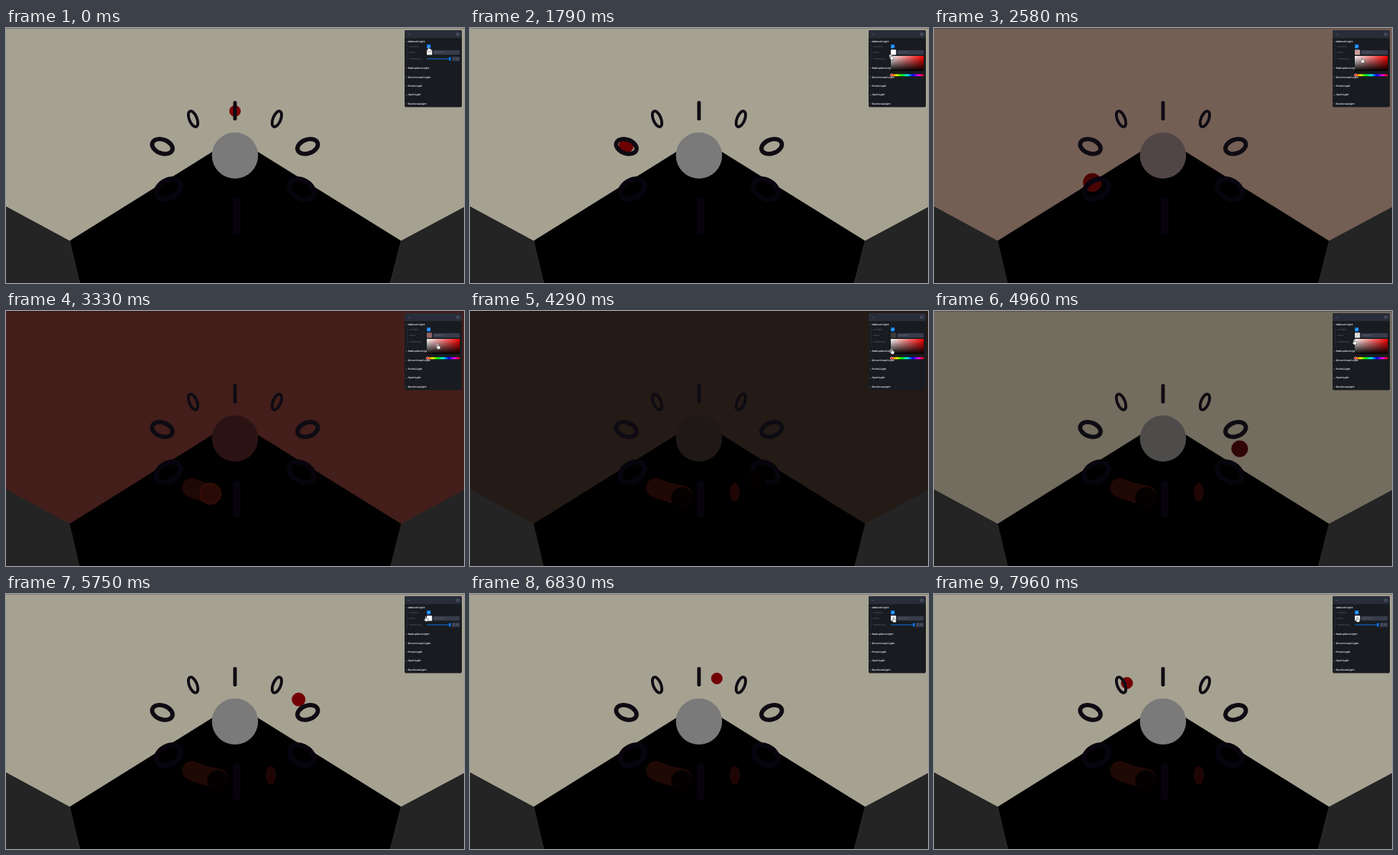
An HTML page that plays this animation: 640x356 px, repeating every 8000 ms.

```html
<!DOCTYPE html>
<html lang="en">
<head>
<meta charset="utf-8">
<title>Ambient light</title>
<style>
html, body { margin: 0; width: 100%; height: 100%; overflow: hidden; background: #000; }
svg { display: block; width: 100vw; height: 100vh; }
text { font: 3.25px "DejaVu Sans Mono", monospace; fill: #6b7180; }
.head { font-weight: bold; fill: #f2f3f5; }
</style>
</head>
<body>
<svg viewBox="0 0 640 356" preserveAspectRatio="none">
  <defs>
    <linearGradient id="sat"><stop stop-color="#fff"/><stop offset="1" stop-color="#f00"/></linearGradient>
    <linearGradient id="val" x2="0" y2="1"><stop stop-color="#000" stop-opacity="0"/><stop offset="1"/></linearGradient>
    <linearGradient id="hue"></linearGradient>
  </defs>
  <rect id="wall" width="640" height="356"/>
  <path d="M0 .5H640" stroke="#000" stroke-opacity=".25"/>
  <path d="M0 249L89 297L103 356H0ZM640 250L552 297L537 356H640Z" fill="#242424"/>
  <path d="M320 153L552 297L537 356H103L89 297Z"/>
  <g id="trail">
    <path id="streak" fill="none" stroke="#1f0905" stroke-width="27" stroke-linecap="round"/>
    <circle id="gap" cx="296" cy="261" r="15" fill="#050101"/>
    <ellipse id="spot" cx="370" cy="253" rx="7" ry="13" fill="#1f0604"/>
  </g>
  <g id="scene"><circle id="globe" cx="320" cy="178" r="32.3"/></g>
  <g id="panel">
    <rect x="557" y="3" width="80" height="107.5" rx="2" fill="#181c20"/>
    <path d="M557 14V5a2 2 0 0 1 2-2h76a2 2 0 0 1 2 2v9Z" fill="#292d39"/>
    <path d="M562 8.5l1 1 1-1" fill="none" stroke="#8c92a4" stroke-width=".6"/>
    <circle cx="631.3" cy="8.7" r="1.7" fill="none" stroke="#8c92a4" stroke-width=".6"/>
    <path d="M560.6 23V47" stroke="#373c4b" stroke-width=".5"/>
    <text x="563" y="26.6">visible</text>
    <text x="563" y="35.4">color</text>
    <text x="563" y="44.4">intensity</text>
    <rect x="588" y="23" width="5.4" height="5.4" rx=".8" fill="#0a7cff"/>
    <path d="M589.3 25.8l1 1 1.8-2.2" fill="none" stroke="#fff" stroke-width=".7"/>
    <rect id="swatch" x="588" y="30.3" width="7.4" height="7.2" rx=".8"/>
    <rect x="597" y="31" width="37" height="6.3" rx=".8" fill="#373c4b"/>
    <text id="hex" x="599" y="35.3" fill="#8c92a4"></text>
    <path d="M588 43H620" stroke="#0a7cff" stroke-width=".9"/>
    <rect x="619" y="40.4" width="2.5" height="5.2" rx=".6" fill="#0a7cff"/>
    <rect x="623" y="40" width="11" height="6.2" rx=".8" fill="#373c4b"/>
    <text x="624.6" y="44.2" fill="#8c92a4">1.00</text>
  </g>
  <g id="picker">
    <rect x="588" y="38.5" width="46.5" height="29.5" fill="#181c20"/>
    <rect x="588" y="39" width="46" height="21" fill="url(#sat)"/>
    <rect x="588" y="39" width="46" height="21" fill="url(#val)"/>
    <rect x="588" y="64.4" width="46" height="2.8" rx="1" fill="url(#hue)"/>
    <circle cx="589" cy="65.8" r="1.6" fill="#f00" stroke="#fff" stroke-width=".6"/>
    <circle id="knob" r="1.8" stroke="#fff" stroke-width=".6"/>
  </g>
  <text class="head" x="562" y="69.7">DirectionalLight</text>
  <path id="hand" d="M-1.2 -2.6q.8 -.9 1.3 .2v2l2.4 .7q.8 .4 .5 1.8l-.7 2.1h-3.3l-2 -2.6q-.3 -1 .8 -.7l1 .7Z"
    fill="#fff" stroke="#111" stroke-width=".45"/>
</svg>
<script>
const LOOP = 8000, SPEED = 50, SWING = 102, DEPTH = 0.314;
const $ = id => document.getElementById(id);
const rad = deg => deg * Math.PI / 180;
const clamp = (v, lo, hi) => Math.min(hi, Math.max(lo, v));

function add(parent, tag, attrs, text) {
  const el = document.createElementNS("http://www.w3.org/2000/svg", tag);
  for (const key in attrs) el.setAttribute(key, attrs[key]);
  if (text) el.textContent = text;
  return parent.appendChild(el);
}
function set(id, attrs) {
  for (const key in attrs) $(id).setAttribute(key, attrs[key]);
}

// Linear interpolation over rows of [time, ...values]
function track(keys, t) {
  const i = keys.findIndex(k => k[0] > t);
  if (i < 0) return keys[keys.length - 1].slice(1);
  if (i === 0) return keys[0].slice(1);
  const a = keys[i - 1], b = keys[i], f = (t - a[0]) / (b[0] - a[0]);
  return a.slice(1).map((v, n) => v + (b[n + 1] - v) * f);
}
const tones = rows => rows.map(([t, hex]) =>
  [t, ...[0, 2, 4].map(i => parseInt(hex.substr(i, 2), 16))]);
const css = rgb => `rgb(${rgb.map(Math.round)})`;

const cursor = [[0, 591, 29], [500, 592, 34], [1000, 591, 34], [1500, 590, 41], [1850, 589, 40],
  [2500, 598, 44], [3330, 604, 49], [3850, 597, 54], [4290, 590, 56], [4830, 588, 45],
  [5200, 587, 39], [5600, 587, 34], [5800, 587, 34], [6400, 593, 36], [7400, 592, 35]];
const wall = tones([[1800, "a6a292"], [3330, "431e1b"], [3850, "2c1b17"], [4290, "241b16"],
  [4830, "585144"], [5200, "a6a292"]]);
const globe = tones([[1800, "7a7a7a"], [3330, "2b1314"], [4290, "1f1816"], [4830, "343331"], [5200, "7a7a7a"]]);
const ball = tones([[0, "800504"], [1800, "6c0000"], [3330, "2a0a06"], [3550, "050000"],
  [4290, "030000"], [4830, "0b0707"], [5200, "720005"]]);
const rim = tones([[1800, "6c0000"], [3330, "551410"], [3550, "050000"], [4400, "030000"],
  [4830, "3d372f"], [5200, "720005"]]);

// Perspective view of the circular orbit; 0 degrees is the far side
function orbit(deg) {
  const c = Math.cos(rad(deg)), w = 1 + DEPTH * c;
  return { x: 320 - SWING * Math.sin(rad(deg)) / w, y: (165 - 12.6 * c) / w, r: 10.5 / w, far: c };
}

const scene = $("scene"), rings = [];
function ring(x, y, rx, ry, tilt, width, far, fill) {
  const el = add(scene, "ellipse", { cx: x, cy: y, rx, ry, fill: "none", stroke: fill,
    "stroke-width": width, transform: `rotate(${tilt} ${x} ${y})` });
  rings.push({ el, far });
}
function bar(x, y, w, h, far, fill) {
  rings.push({ el: add(scene, "rect", { x, y, width: w, height: h, rx: w / 3, fill }), far });
}
const dark = "#0e0b13", dim = "#08040e";
bar(317.5, 102, 5, 27, 1, dark);
for (const s of [-1, 1]) {
  ring(320 + 58.5 * s, 127, 5.4, 11.6, 22 * s, 4, .707, dark);
  ring(320 + 101.5 * s, 165.4, 14.8, 9.6, -20 * s, 6, 0, dark);
  ring(320 + 93 * s, 225, 18.5, 12.5, 30 * s, 7, -.707, dim);
}
bar(317.5, 237, 10, 51, -1, dim);
rings.sort((a, b) => b.far - a.far);
rings.forEach(r => scene.appendChild(r.el));
const dot = add(scene, "circle", { "stroke-width": 0.8 });

["AmbientLight", "HemisphereLight", "", "PointLight", "SpotLight", "RectAreaLight"].forEach((name, i) => {
  const y = i ? 45 + 12.35 * i : 20.4;
  if (name) add($("panel"), "text", { x: 562, y, class: "head" }, name);
  add($("panel"), "path", { d: i ? `M559.3 ${y - 2}l1.3 1-1.3 1Z` : `M559 ${y - 1.6}h2l-1 1.3Z`, fill: "#8c92a4" });
});
for (let i = 0; i <= 6; i++) add($("hue"), "stop", { offset: i / 6, "stop-color": `hsl(${i * 60},100%,50%)` });

let order = -1;
function draw(t) {
  const deg = t * SPEED / 1000, p = orbit(deg);

  set("wall", { fill: css(track(wall, t)) });
  set("globe", { fill: css(track(globe, t)) });
  dot.setAttribute("cx", p.x);
  dot.setAttribute("cy", p.y);
  dot.setAttribute("r", p.r - .4);
  dot.setAttribute("fill", css(track(ball, t)));
  dot.setAttribute("stroke", css(track(rim, t)));

  // Keep the ball behind every ring that is nearer to the camera
  const next = rings.findIndex(r => r.far <= p.far + .06);
  if (next !== order) {
    scene.insertBefore(dot, next < 0 ? null : rings[next].el);
    order = next;
  }

  const end = clamp(deg, 155, 171);
  let d = "";
  for (let a = 155; a <= end; a += 2) {
    const q = orbit(a);
    d += `${d ? "L" : "M"}${q.x.toFixed(1)} ${q.y.toFixed(1)}`;
  }
  set("streak", { d: d + "l.01 0", visibility: deg > 155 ? "visible" : "hidden" });
  set("gap", { visibility: t > 3500 ? "visible" : "hidden" });
  set("spot", { visibility: t > 4050 ? "visible" : "hidden" });

  const [x, y] = track(cursor, t), open = t > 1150 && t < 5400;
  const drag = t > 1850 && t < 5200;
  const s = drag ? clamp((x - 589) / 46, 0, 1) : 0;
  const v = drag ? clamp(1 - (y - 40) / 21, 0, 1) : 1;
  const rgb = [v, v * (1 - s), v * (1 - s)].map(c => Math.round(c * 255));
  set("swatch", { fill: css(rgb) });
  $("hex").textContent = "#" + rgb.map(c => c.toString(16).padStart(2, "0")).join("");
  set("picker", { visibility: open ? "visible" : "hidden" });
  set("knob", { cx: 588 + s * 46, cy: 39 + (1 - v) * 21, fill: css(rgb) });
  set("hand", { transform: `translate(${x} ${y})` });
}

let start;
function tick(now) {
  if (start === undefined) start = now;
  draw((now - start) % LOOP);
  requestAnimationFrame(tick);
}
draw(0);
requestAnimationFrame(tick);
</script>
</body>
</html>
```
